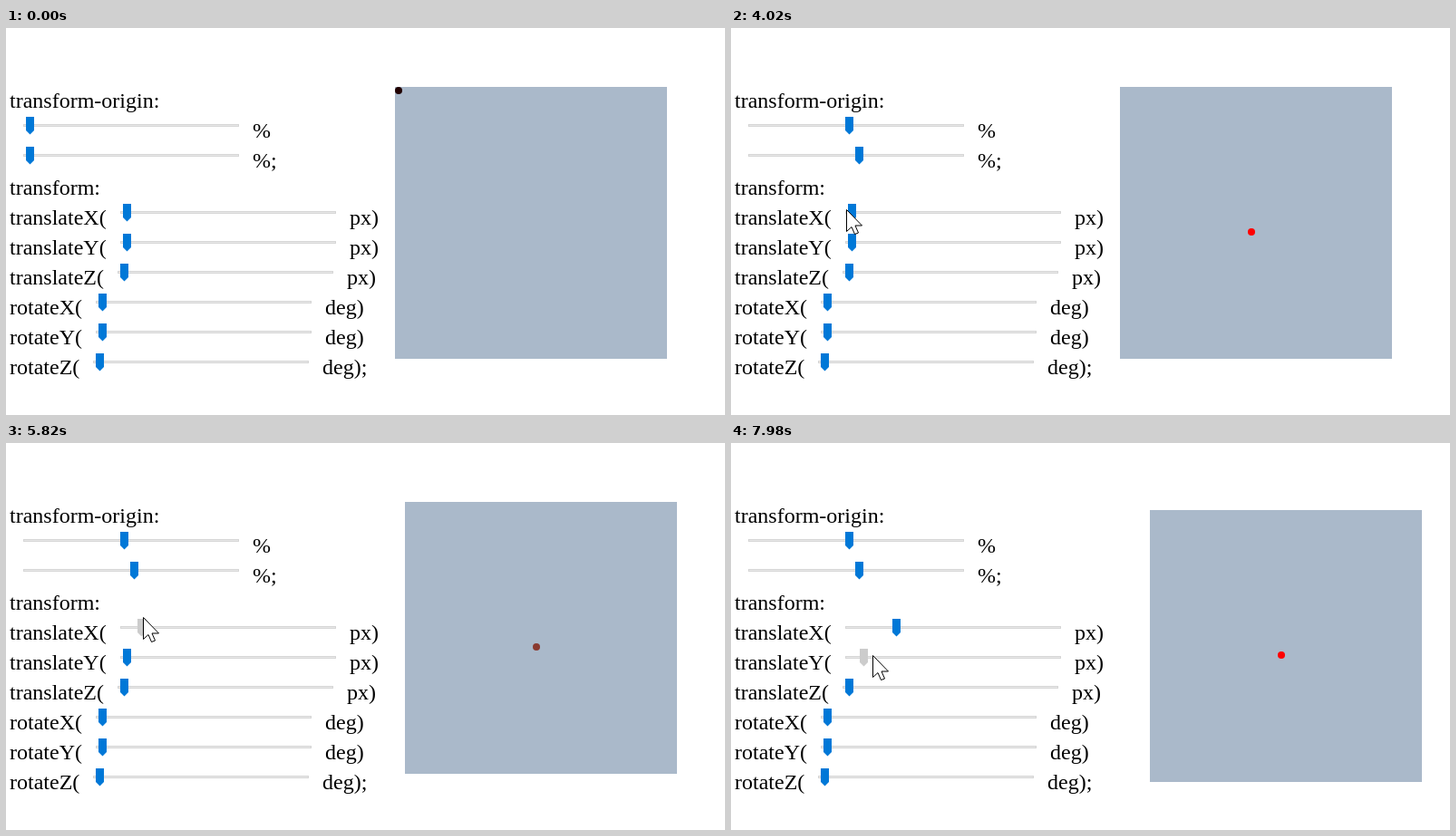
Write an HTML page that moves like this. It is 793 by 427 pixels and loops after 8000 ms.

```html
<!DOCTYPE html>
<html lang="en">
<head>
<meta charset="utf-8">
<title>Transform sliders</title>
<style>
  html, body { margin: 0; width: 100%; height: 100%; overflow: hidden; background: #fff; }
  svg { display: block; width: 793px; height: 427px; }
  text { font: 24px "Liberation Serif", "Times New Roman", serif; }
  .track { fill: #e7e7e7; stroke: #d6d6d6; }
  .thumb { fill: #0078d7; }
  .hover { fill: #1f1f1f; }
  .pressed { fill: #ccc; }
</style>
</head>
<body>
<svg id="stage" viewBox="0 0 793 427">
  <g id="panel"></g>
  <g id="box">
    <rect x="429" y="65" width="300" height="300" fill="#aab9ca"/>
    <circle id="dot" r="4"/>
  </g>
  <path id="cursor" d="M.5.5V24.5L6 19.5 9.5 27.5 13.5 26 10 18H17.5Z" fill="#fff" stroke="#000"/>
</svg>
<script>
const LOOP = 8000, TICK = 77.5, TICK_SHIFT = 12;
const TRACK = 238, TRAVEL = 222, GAP = 15, MARGIN = 4, LINE = 33;

const $ = id => document.getElementById(id);
const moveTo = (node, x, y) =>
  node.setAttribute('transform', `translate(${Math.round(x)} ${Math.round(y)})`);

function add(tag, attrs, text = '') {
  const node = document.createElementNS('http://www.w3.org/2000/svg', tag);
  for (const key in attrs) node.setAttribute(key, attrs[key]);
  node.textContent = text;
  return $('panel').appendChild(node);
}
const label = (x, y, text) => add('text', { x, y }, text);

// Each track starts a fixed gap after its label, the unit follows the track.
function addSlider(name, unit, base) {
  const left = Math.round(MARGIN + label(MARGIN, base, name).getComputedTextLength() + GAP);
  label(left + TRACK + GAP, base, unit);
  add('rect', { class: 'track', x: left + .5, y: base - 14.5, width: TRACK - 1, height: 2 });
  const node = add('path', { class: 'thumb', d: 'M0 0H9V15L4.5 19.5 0 15Z' });
  const place = part => moveTo(node, left + 3 + part * TRAVEL, base - 23);
  place(0);
  return { node, place };
}

label(MARGIN, 88, 'transform-origin:');
label(MARGIN, 184, 'transform:');
const thumbs = [
  ' %', ' %;',
  'translateX( px)', 'translateY( px)', 'translateZ( px)',
  'rotateX( deg)', 'rotateY( deg)', 'rotateZ( deg);'
].map((row, i) => addSlider(...row.split(' '), 121 + LINE * i + (i > 1 ? 30 : 0)));

// A move is [start tick, end tick, ...values reached]; the part rests in between.
// Origins are in percent, translations in px.
const sliders = [
  { max: 100, release: 26, moves: [[13, 21, 47]] },
  { max: 100, release: 47, moves: [[33, 40, 54], [44, 46, 52]] },
  { max: 150, release: 81, moves: [[56, 64, 117], [64, 70, 0], [72, 79.8, 33]] },
  { max: 150, release: Infinity, moves: [[86, 93.6, 71], [93.6, 101, 5], [101, 103, 9]] }
];
const cursorMoves = [
  [4, 12, 26, 101], [13, 21, 133, 90],
  [25, 26, 102, 104], [26, 32, 26, 140], [33, 40, 147, 138],
  [44, 49, 86, 178], [49, 53, 134, 204], [55, 63, 312, 165], [63, 69, 99, 190], [71, 78, 185, 193],
  [80, 85, 136, 232], [85, 93, 228, 228], [93, 100, 150, 232], [101, 103, 156, 234]
];

const smooth = p => p * p * (3 - 2 * p);
const progress = (t, from, to) => smooth(Math.min(1, Math.max(0, (t - from) / (to - from))));
const follow = (moves, tick, rest) => moves.reduce((at, [from, to, ...goal]) =>
  at.map((v, i) => v + (goal[i] - v) * progress(tick, from, to)), rest);

function thumbState({ moves: [[press]], release }, tick) {
  if (tick < press - 1 || tick >= release) return 'thumb';
  return tick < press ? 'hover' : 'pressed';
}

function dotColor(tick) {
  const [origin, , shiftX, shiftY] = sliders.map(s => s.moves);
  if (tick <= origin[0][0]) return '#200000';
  return tick > shiftX[0][0] && tick < shiftY[1][1] ? '#8a3a30' : '#f00';
}

function render(now) {
  const tick = Math.floor((now % LOOP + TICK_SHIFT) / TICK);
  const [originX, originY, x, y] = sliders.map((slider, i) => {
    const [value] = follow(slider.moves, tick, [0]);
    thumbs[i].place(value / slider.max);
    thumbs[i].node.setAttribute('class', thumbState(slider, tick));
    return value;
  });
  moveTo($('box'), x, y);
  $('dot').setAttribute('cx', 433 + originX * 3);
  $('dot').setAttribute('cy', 69 + originY * 3);
  $('dot').setAttribute('fill', dotColor(tick));
  moveTo($('cursor'), ...follow(cursorMoves, tick, [-24, 77]));
}

const start = performance.now();
function loop() {
  render(performance.now() - start);
  requestAnimationFrame(loop);
}
loop();
</script>
</body>
</html>
```
